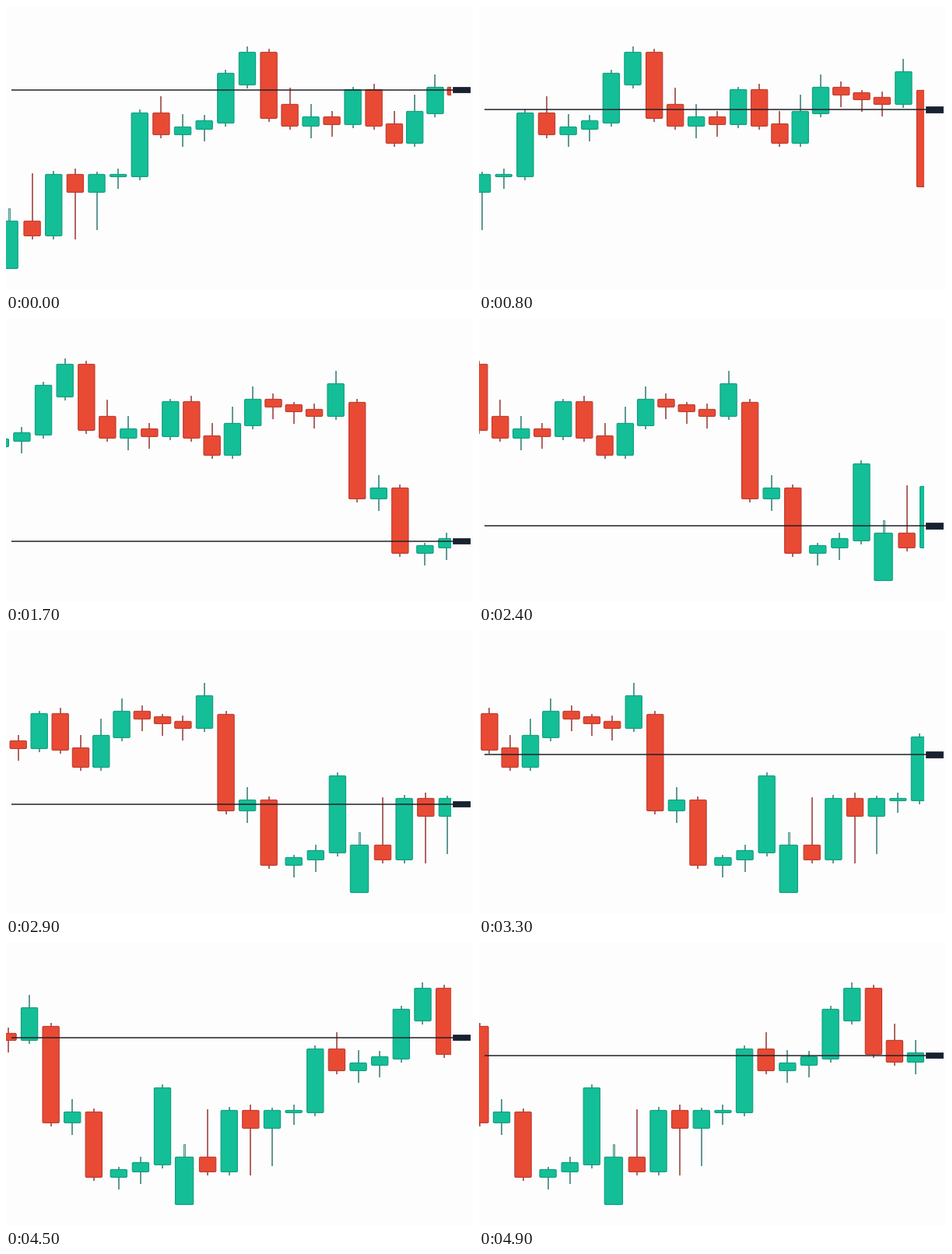
Animation, 600 px wide and 365 px high, one loop 5 s. Source, as a matplotlib script:

```python
import math

import matplotlib.pyplot as plt
import numpy as np
from matplotlib.animation import FuncAnimation
from matplotlib.patches import FancyBboxPatch, Rectangle

W, H, DPI = 600, 365, 100
PX = 72 / DPI
EDGE = 572            # candles are revealed left of this x
STEP = 9.37           # scroll per tick, 15 ticks a second
FRAMES, INTERVAL = 50, 100

BG, INK, TAG = "#fdfdfd", "#20202a", "#172130"
UP = dict(fill="#14be97", edge="#0f9d7e", wick="#2c7a71")
DOWN = dict(fill="#e84a34", edge="#bd3a2c", wick="#933632")

# The market walk: closing heights, y downwards
CLOSES = [277, 296, 217, 240, 217, 217, 138, 166, 156, 148, 87,
          60, 145, 155, 143, 153, 108, 155, 177, 136, 105,
          115, 121, 127, 85, 233, 219, 303, 293, 284, 188]
N = len(CLOSES)
JUMPS = {0: 150, 11: 15, 13: -18, 25: 24}   # opens away from the last close
HIGHS, LOWS = {1: 61}, {3: 61, 4: 49}       # unusually long wicks
OVERLAP = 3

fig = plt.figure(figsize=(W / DPI, H / DPI), dpi=DPI, facecolor=BG)


def pixel_axes(width):
    ax = fig.add_axes([0, 0, width / W, 1])
    ax.set(xlim=(0, width), ylim=(H, 0))
    ax.axis("off")
    return ax


chart = pixel_axes(EDGE)
overlay = pixel_axes(W)


def center(i):
    """Nearly even spacing, a little tighter in the quiet middle."""
    lap, k = divmod(i, N)
    x = np.interp(k, [0, 1, 12, 17, 23, 27, 28, N],
                  [4, 34, 338, 473, 630.7, 741, 773, 857.3])
    return x + lap * 853.3


def wicks(k, body):
    """Long candles have short wicks; the others swell in a slow wave."""
    above = 4 if body > 62 else 12 + 9 * math.cos(math.pi * (k - 13) / 3)
    below = 16 if body < 15 else 5
    return HIGHS.get(k, above), LOWS.get(k, below)


def draw_candle(x, k, start):
    close = CLOSES[k]
    style = UP if close <= start else DOWN
    top, body = min(start, close) - 0.6, abs(start - close)
    above, below = wicks(k, body)
    lowest = k == 0
    if lowest:
        chart.add_patch(Rectangle((x - 1, top - above), 2.2, above, fc="#a9ddd0",
                                  ec=style["wick"], lw=0.8 * PX, zorder=1))
    else:
        chart.plot([x, x], [top - above, top + body + below],
                   color=style["wick"], lw=1.5 * PX,
                   solid_capstyle="butt", zorder=1)
    width = 23.3 if lowest else 21.3
    rounding = min(1.4, body / 2)
    chart.add_patch(FancyBboxPatch(
        (x - width / 2, top), width, body,
        boxstyle=f"round,pad=0,rounding_size={rounding}",
        fc=style["fill"], ec=style["edge"], lw=1.1 * PX, zorder=2))


def draw_market():
    was_up = True
    for i in range(2 * N):
        k = i % N
        last = CLOSES[k - 1]
        up = CLOSES[k] <= last
        # A run in one direction reopens slightly inside the previous body.
        overlap = (OVERLAP if up else -OVERLAP) if up == was_up else 0
        start = last + JUMPS.get(k, overlap)
        draw_candle(center(i), k, start)
        was_up = CLOSES[k] <= start


def price_at(tick):
    """Glide from one close to the next, about three ticks per candle."""
    k, part = divmod(21.31 + 0.3348 * tick, 1)
    before, after = CLOSES[int(k - 1) % N], CLOSES[int(k) % N]
    return before + (after - before) * part


draw_market()
price_line, = overlay.plot([7, 575], [0, 0], color=INK, lw=1.5 * PX,
                           solid_capstyle="butt")
price_tag = overlay.add_patch(Rectangle((574.2, 0), 22, 7.4, fc=TAG, ec=TAG,
                                        lw=0.8 * PX, joinstyle="round"))


def update(frame):
    tick = frame * 3 // 2
    scroll = tick * STEP + 0.4
    chart.set_xlim(scroll, scroll + EDGE)
    y = price_at(tick)
    price_line.set_ydata([y, y])
    price_tag.set_y(y - 4.1)
    return price_line, price_tag


anim = FuncAnimation(fig, update, frames=FRAMES, interval=INTERVAL,
                     repeat=True, repeat_delay=0, blit=False)
plt.show()
```
